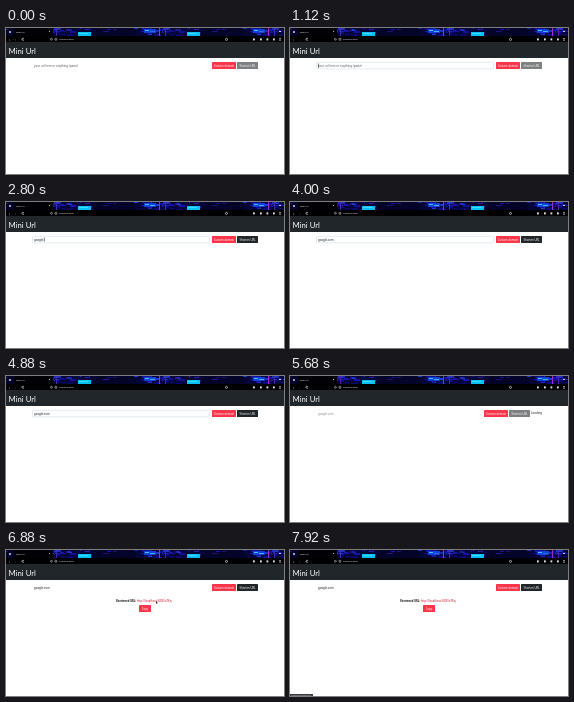
Write an HTML page with a canvas that moves like this. It is 278x146 px and loops after 8000 ms.

```html
<!DOCTYPE html>
<html lang="en">
<head>
<meta charset="utf-8">
<title>Mini Url</title>
<style>
html, body { margin: 0; width: 100%; height: 100%; overflow: hidden; background: #fff; }
canvas { display: block; width: 278px; height: 146px; }
</style>
</head>
<body>
<canvas id="stage" width="278" height="146"></canvas>
<script>
const ctx = document.getElementById('stage').getContext('2d');
const LOOP = 8000, STEP = 80;
const SANS = '"Noto Sans", "Open Sans", sans-serif';
const RED = '#fb3549', DARK = '#20262a', GREY = '#7d7f81';
const FOCUS = 1040, TYPE = 1920, BLUR = 3600, SEND = 5040, DONE = 6000, HOVER = 6560, STATUS = 7000;

function box(x, y, w, h, color) {
  ctx.fillStyle = color;
  ctx.fillRect(x, y, w, h);
}

function rounded(x, y, w, h, r, fill, stroke) {
  ctx.beginPath();
  ctx.roundRect(x, y, w, h, r);
  if (fill) { ctx.fillStyle = fill; ctx.fill(); }
  if (stroke) { ctx.strokeStyle = stroke; ctx.lineWidth = 0.6; ctx.stroke(); }
}

function label(str, x, y, size, color, weight = 400, align = 'left', family = SANS) {
  ctx.font = `${weight} ${size}px ${family}`;
  ctx.textAlign = align;
  ctx.fillStyle = color;
  ctx.fillText(str, x, y);
  return ctx.measureText(str).width;
}

function noise(n) {
  const v = Math.sin(n * 12.9898) * 43758.5453;
  return v - Math.floor(v);
}

// Neon skyline behind the tabs, repeated along the bar
function skyline(step) {
  const blues = ['#0b0b8c', '#1616bd', '#06063c', '#3a14a0', '#1f3fd8'];
  box(0, 0, 278, 8, '#05053a');
  for (let x0 = -61; x0 < 278; x0 += 109) {
    box(x0 + 36, 0, 46, 8, '#040428');
    for (let i = 0; i < 56; i++) {
      const x = x0 + (80 + Math.floor(noise(i + 3) * (i % 4 ? 66 : 108))) % 109;
      const y = Math.floor(noise(i + 40) * 8);
      const w = 1 + Math.floor(noise(i + 80) * 7);
      const h = Math.min(8 - y, 1 + i % 2);
      ctx.globalAlpha = 0.55 + 0.45 * noise(i * 7 + step % 6);
      box(x, y, w, h, blues[i % 5]);
    }
    ctx.globalAlpha = 1;
    box(x0 + 24, 4, 13, 4, step % 12 === 5 ? '#1090e0' : '#08c0fa');
    box(x0 + 25, 5, 9, 1, '#3ddcff');
    box(x0 + 90, 1, 12, 4, '#1440d8');
    box(x0 + 91, 2, 4, 1, '#39c4ff');
    box(x0 + 96, 3, 5, 1, step % 3 ? '#36b8fa' : '#2470e0');
    box(x0 + 105, 0, 1, 8, '#a02ad0');
    box(x0 + 2, 0, 1, 8, '#4a25b0');
  }
}

function browser(step) {
  skyline(step);
  box(8, 0, 39, 8, '#020206');
  box(3, 3, 2, 2, '#a0a0c0');
  label('Mini Url', 10, 5, 2.3, '#fff');
  box(43, 3, 1, 1, '#b0b0ba');
  box(273, 3, 2, 1, '#d0d0e0');
  box(0, 8, 278, 6, '#000');
  label('‹', 3, 13, 4, '#fff');
  label('›', 9, 13, 4, '#66666c');
  ctx.beginPath();
  ctx.arc(17, 11.3, 1, 0.5, 5.8);
  ctx.strokeStyle = '#fff';
  ctx.lineWidth = 0.7;
  ctx.stroke();
  rounded(44.5, 10.4, 1.8, 1.8, 0.8, null, '#d0d0d6');
  rounded(49, 10.4, 1.8, 1.8, 0.3, null, '#d0d0d6');
  label('localhost:3000', 53, 12.4, 2.2, '#fff', 500);
  rounded(219.5, 10.4, 2, 2, 0.9, null, '#fff');
  for (const x of [247, 254, 260.5, 267]) box(x, 10.4, 1.8, 2, '#e2e2e6');
  box(273, 10.5, 2, 0.6, '#fff');
  box(273, 11.8, 2, 0.6, '#fff');
}

function button(x, w, str, color, y = 34) {
  rounded(x, y, w, 7, 0.6, color);
  label(str, x + w / 2, y + 4.6, 2.75, '#fff', 500, 'center');
}

function form(t) {
  const loading = t >= SEND && t < DONE;
  const shift = loading ? -12 : 0;
  const focused = t >= FOCUS && t < SEND;
  const chars = Math.max(0, Math.min(10, t < 2640 ? 1 + Math.floor((t - TYPE) / 120) : 7 + Math.floor((t - 2640) / 260)));
  const value = 'google.com'.slice(0, chars);

  if (focused) rounded(26.5, 34.3, 177, 6.6, 0.8, null, '#d0dde9');
  let w = 0;
  if (value) w = label(value, 28, 38.7, 2.8, loading ? '#85898d' : '#14181c');
  else label('your url here or anything (paste)', 28, 38.7, 2.9, '#55595e');
  const caret = t >= FOCUS && t < BLUR && ((t - FOCUS) % 1000 < 500 || t >= TYPE && t < 2900);
  if (caret) box(28 + w, 35.6, 0.6, 4, '#222');

  button(206 + shift, 24, 'Custom domain', RED);
  button(231 + shift, 21, 'Shorten URL', value && !loading ? DARK : GREY);
  if (loading) label('Loading', 241, 38.2, 2.9, '#14181c');
}

function pointer(x, y) {
  ctx.beginPath();
  ctx.moveTo(x, y);
  ctx.lineTo(x, y + 3);
  ctx.lineTo(x + 0.8, y + 2.3);
  ctx.lineTo(x + 2, y + 2.2);
  ctx.closePath();
  ctx.fillStyle = '#222';
  ctx.fill();
}

function result(t) {
  if (t < DONE) return;
  const w = label('Shortened URL: ', 110, 51.7, 2.6, '#0c1014', 700);
  label('http://localhost:3000/x7Kq', 110 + w, 51.7, 2.8, '#d8152c');
  button(133, 12, 'Copy', RED, 55);
  if (t >= HOVER && t < STATUS) pointer(150, 51);
  if (t >= STATUS) {
    box(0, 144, 23, 2, '#36363c');
    label('localhost:3000/x7Kq', 1, 145.7, 2.1, '#e0e0e4');
  }
}

function draw(now) {
  const step = Math.floor(now % LOOP / STEP);
  const t = step * STEP;
  box(0, 0, 278, 146, '#fff');
  browser(step);
  box(0, 14, 278, 16, DARK);
  label('Mini Url', 2.6, 26, 7.7, '#fff', 400, 'left', 'Lato, "Noto Sans", sans-serif');
  form(t);
  result(t);
}

const start = performance.now();
function tick() {
  draw(performance.now() - start);
  requestAnimationFrame(tick);
}
tick();
</script>
</body>
</html>
```
